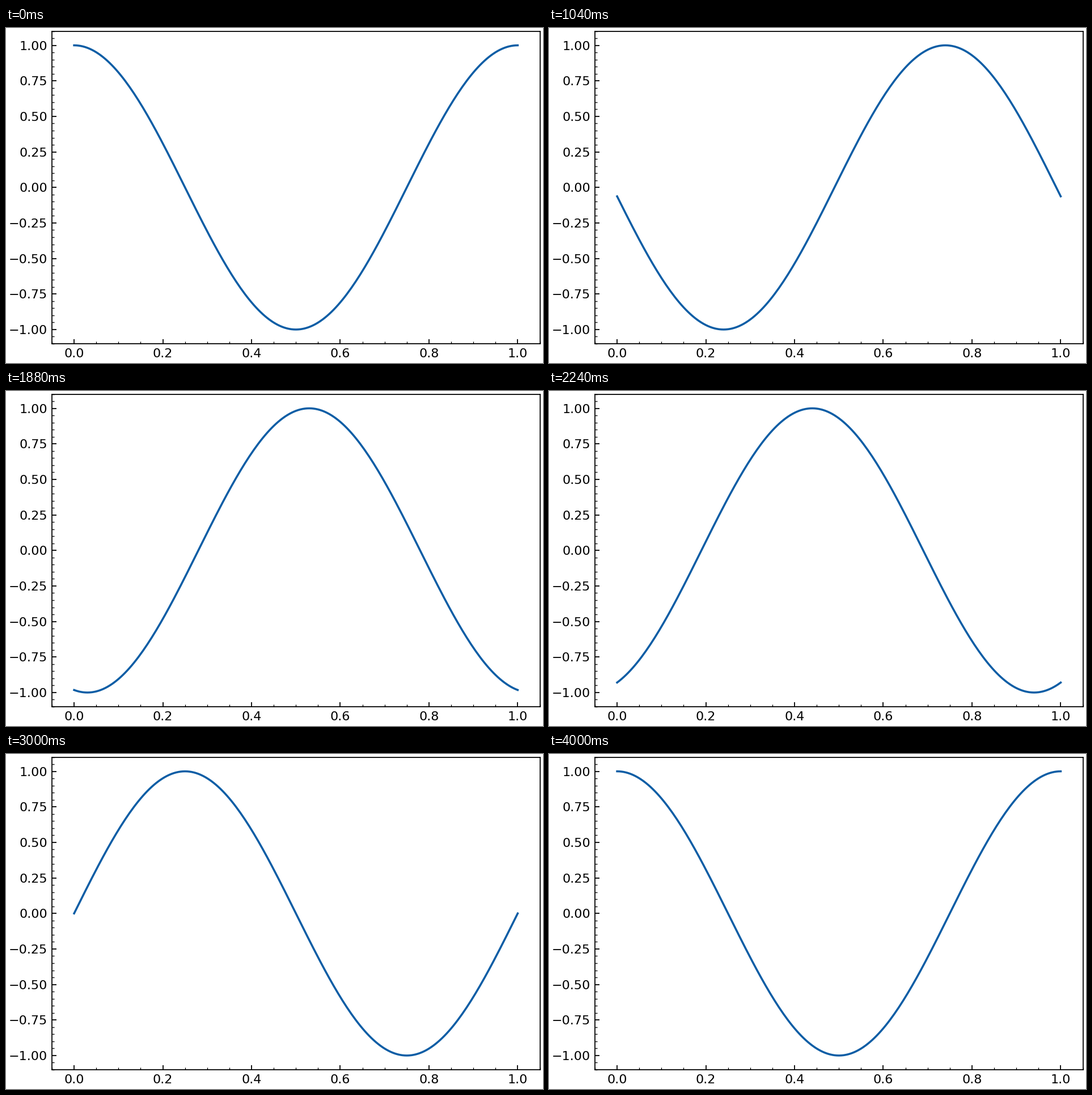
These frames come from a looping animation (947x591 px, 4040 ms). A matplotlib script:

```python
import matplotlib.pyplot as plt
import numpy as np
from matplotlib.animation import FuncAnimation
from matplotlib.ticker import AutoMinorLocator, MultipleLocator

W, H, DPI = 947, 591, 160
LEFT, RIGHT, TOP, BOTTOM = 81, 941.5, 5.5, 557
FRAMES, INTERVAL = 101, 40

plt.rcParams.update({
    "font.family": "DejaVu Sans",
    "font.size": 10,
    "xtick.direction": "in",
    "ytick.direction": "in",
})

fig = plt.figure(figsize=(W / DPI, H / DPI), dpi=DPI, facecolor="white")
ax = fig.add_axes([LEFT / W, 1 - BOTTOM / H, (RIGHT - LEFT) / W, (BOTTOM - TOP) / H])
ax.set_xlim(-0.05, 1.05)
ax.set_ylim(-1.1, 1.1)
for axis, step in ((ax.xaxis, 0.2), (ax.yaxis, 0.25)):
    axis.set_major_locator(MultipleLocator(step))
    axis.set_minor_locator(AutoMinorLocator())

x = np.linspace(0, 1, 201)


def wave(phase):
    return np.cos(2 * np.pi * (x + phase))


line, = ax.plot(x, wave(0), color="#0C5DA5", lw=1.6)


def update(i):
    # one full period over the loop, both ends included
    line.set_ydata(wave(i / (FRAMES - 1)))
    return line,


anim = FuncAnimation(fig, update, frames=FRAMES, interval=INTERVAL, repeat=True, repeat_delay=0)
plt.show()
```
